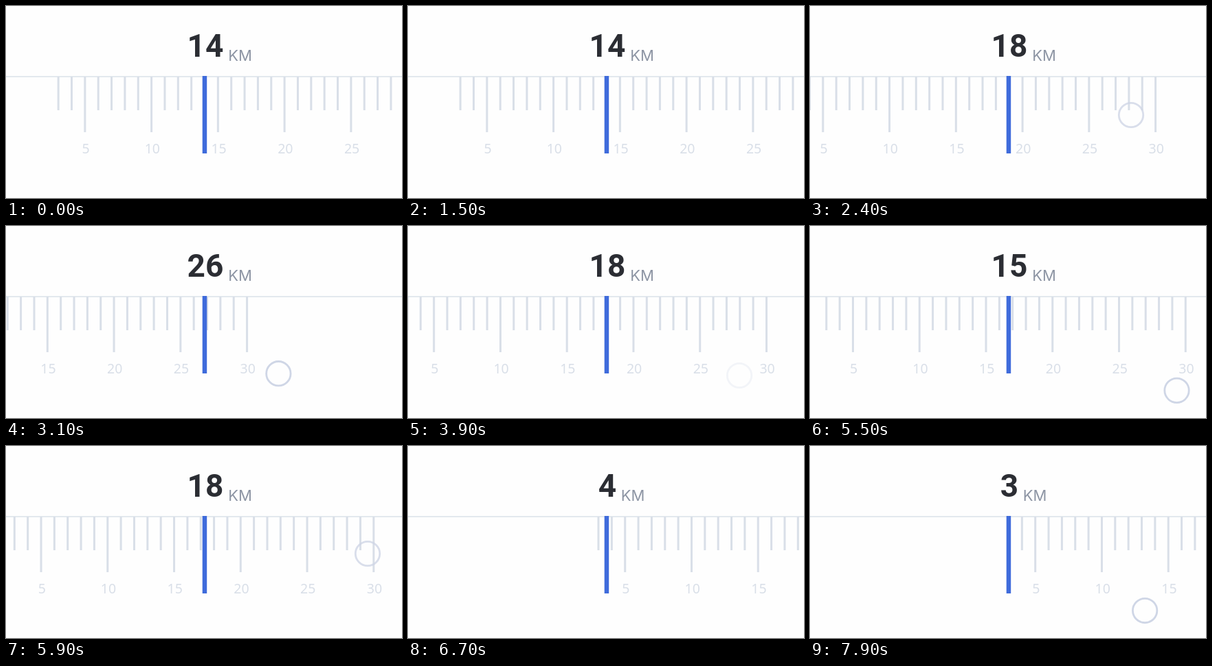
Animation of 576x280 px, one loop 8000 ms. Source, as an HTML page:

```html
<!DOCTYPE html>
<html lang="en">
<head>
<meta charset="utf-8">
<title>Distance ruler</title>
<style>
html, body { margin: 0; width: 100%; height: 100%; overflow: hidden; background: #fefefe; }
svg { display: block; width: 576px; height: 280px; font-family: Roboto, sans-serif; }
.tick { stroke: #d9dfe8; stroke-width: 3; }
.label { fill: #d9dfe8; font: 19.5px "Noto Sans", sans-serif; text-anchor: middle; }
.touch { fill: none; stroke: #cfd6e6; stroke-width: 2.8; }
#number { fill: #2b2d33; font-size: 46px; font-weight: 700; text-anchor: middle; }
#unit { fill: #8d95a4; font: 22px Inter, sans-serif; }
</style>
</head>
<body>
<svg viewBox="0 0 576 280">
  <rect y="102.2" width="576" height="1.6" fill="#dde4ea"/>
  <g id="ruler"></g>
  <rect x="285.7" y="102" width="6.5" height="113" fill="#3f6bdb"/>
  <text id="number" x="290" y="74"></text>
  <text id="unit" y="80">KM</text>
  <g id="touches"></g>
</svg>
<script>
const LOOP = 8000, CENTER = 289, STEP = 19.35, MIN = 3, MAX = 30, START = 14;
const GAIN = 2 / STEP;  // the ruler travels twice as far as the finger
const LABEL_LAG = 120, SETTLE = 220, FADE_IN = 100, FADE_OUT = 160;

// A finger follows a curve from, bend, to; on release the ruler glides to rest.
const strokes = [
  { press: 1750, release: 2368, from: [515, 224], bend: [492, 195], to: [467, 159], rest: 19 },
  { press: 2550, release: 3780, from: [472, 165], bend: [315, 245], to: [482, 218], rest: 18 },
  { press: 4150, release: 4870, from: [393, 215], bend: [292, 294], to: [422, 157], rest: 15 },
  { press: 5350, release: 5868, from: [550, 262], bend: [515, 230], to: [526, 157], rest: 4 },
  { press: 7150, hold: 250, release: 8000, from: [255, 232], bend: [394, 289], to: [533, 221], rest: MIN }
];
const drift = { release: 6450, settle: 550, rest: MIN };
const moves = [...strokes, drift].sort((a, b) => a.release - b.release);

const $ = id => document.getElementById(id);
const clamp = (v, lo, hi) => Math.min(hi, Math.max(lo, v));
const progress = (t, start, length) => clamp((t - start) / length, 0, 1);
const ease = u => u < 0.5 ? 4 * u ** 3 : 1 - 4 * (1 - u) ** 3;

function add(parent, tag, attrs, text = "") {
  const el = document.createElementNS("http://www.w3.org/2000/svg", tag);
  for (const name in attrs) el.setAttribute(name, attrs[name]);
  el.textContent = text;
  return parent.appendChild(el);
}

function finger({ press, hold = 0, release, from, bend, to }, t) {
  const u = progress(t, press + hold, release - press - hold), w = 1 - u;
  return from.map((p, i) => w * w * p + 2 * u * w * bend[i] + u * u * to[i]);
}

function rulerValue(t) {
  let value = START;
  for (const move of moves) {
    if (move.from) value += (move.from[0] - finger(move, t)[0]) * GAIN;
    value = clamp(value, MIN, MAX);
    value += (move.rest - value) * ease(progress(t, move.release, move.settle || SETTLE));
  }
  return value;
}

for (let n = MIN; n <= MAX; n++) {
  const x = n * STEP, major = n % 5 === 0;
  add($("ruler"), "line", { class: "tick", x1: x, x2: x, y1: 103, y2: major ? 184 : 152 });
  if (major) add($("ruler"), "text", { class: "label", x: x + 1.2, y: 215 }, n);
}

const circles = strokes.map(() => add($("touches"), "circle", { class: "touch", r: 17.7 }));

function draw(t) {
  $("ruler").setAttribute("transform", `translate(${CENTER - rulerValue(t) * STEP} 0)`);

  const shown = Math.round(rulerValue(t - LABEL_LAG));
  $("number").textContent = shown;
  $("unit").setAttribute("x", shown > 9 ? 323.3 : 309.8);

  strokes.forEach((stroke, i) => {
    const [x, y] = finger(stroke, t);
    const opacity = progress(t, stroke.press, FADE_IN) * (1 - progress(t, stroke.release, FADE_OUT));
    circles[i].setAttribute("cx", x);
    circles[i].setAttribute("cy", y);
    circles[i].setAttribute("opacity", opacity);
  });
}

const start = performance.now();
function frame() {
  draw((performance.now() - start) % LOOP);
  requestAnimationFrame(frame);
}
frame();
</script>
</body>
</html>
```
